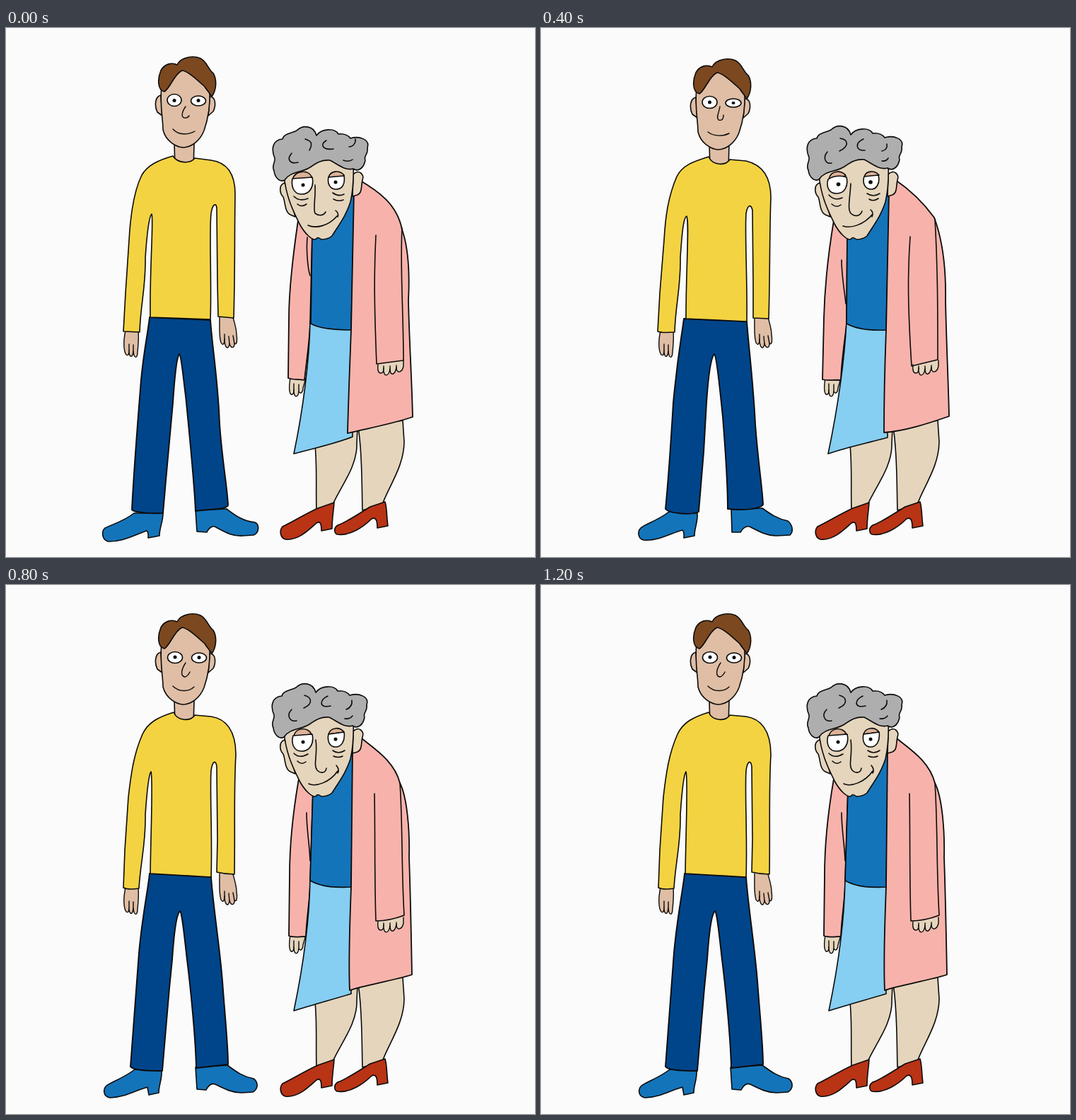
Write an HTML page without scripts that moves like this. It is 748 px wide and 748 px high and loops after 1.4 s.

```html
<!DOCTYPE html>
<html lang="en">
<head>
<meta charset="utf-8">
<title>Two people standing</title>
<style>
html, body { margin: 0; height: 100%; overflow: hidden; background: #fbfbfb; }
svg { display: block; width: 100%; height: 100%; }
path, ellipse { stroke: #0b0b0b; stroke-width: 1.6; stroke-linecap: round; stroke-linejoin: round; fill: none; }

.skin path, path.skin { fill: #dfbea5; }
.old path { fill: #e5d5bc; }
.hair { fill: #7c4820; }
.grey { fill: #aeaeae; }
path.lid { fill: #dcb196; }
.yellow path { fill: #f4d342; }
.navy path { fill: #00458a; stroke-width: 1.9; }
.blue path { fill: #1474ba; }
.sky path { fill: #86cef2; }
.pink path { fill: #f7b3ab; stroke-width: 1.8; }
.red path { fill: #b93315; }
.thin path { stroke-width: 1.4; }
path.line, .line path { fill: none; }
.eye { fill: #fff; }
ellipse.dot { fill: #0b0b0b; stroke: none; }

/* Three hand-drawn poses, held 200 ms each: a b c a b c b */
.a, .b, .c, .bob, .sway { animation: 1.4s step-end infinite; }
.a { animation-name: a; }
.b { animation-name: b; }
.c { animation-name: c; }
.bob { animation-name: bob; }
.sway { animation-name: sway; }
@keyframes a {
  0%, 42.857% { visibility: visible; }
  14.285%, 57.142%, 100% { visibility: hidden; }
}
@keyframes b {
  0%, 28.571%, 42.857%, 71.428% { visibility: hidden; }
  14.285%, 57.142%, 85.714%, 100% { visibility: visible; }
}
@keyframes c {
  0%, 42.857%, 85.714%, 100% { visibility: hidden; }
  28.571%, 71.428% { visibility: visible; }
}
@keyframes bob {
  0%, 42.857%, 85.714%, 100% { transform: none; }
  28.571%, 71.428% { transform: translate(0, 3px); }
}
@keyframes sway {
  0%, 42.857% { transform: none; }
  14.285%, 57.142%, 85.714%, 100% { transform: translate(-1px, 0); }
  28.571%, 71.428% { transform: translate(-1px, -1px); }
}
</style>
</head>
<body>
<svg viewBox="0 0 748 748">
  <!-- Man: shoes, hands, trousers -->
  <g class="blue">
    <path class="a" d="M181 686C168 697 147 703 140 707C135 711 135 723 144 726C166 727 183 716 199 711C202 713 201 717 201 721L217 718C217 706 222 699 222 686Z"/>
    <path class="b" d="M182 685C167 697 148 703 142 708C137 713 137 723 147 725C170 724 184 714 200 710L202 721L216 718C216 706 221 699 220 686Z"/>
    <path class="c" d="M181 684C166 696 146 702 141 707C136 712 137 722 145 724C166 726 184 714 200 710C203 713 202 717 202 721L217 718C217 706 222 699 221 686Z"/>
    <path class="a" d="M268 682L270 712L284 713C287 706 293 703 297 706C310 713 320 719 335 718L350 717C359 713 358 702 352 699C334 697 324 689 312 680Z"/>
    <path class="b" d="M268 682L270 713L283 714C287 706 291 704 296 706C310 713 320 718 333 718L349 717C358 712 356 702 350 698C334 695 324 687 313 679Z"/>
    <path class="c" d="M269 681L270 713L282 713C286 706 290 704 295 705C310 713 320 718 333 718L352 717C358 711 355 702 349 697C334 694 324 687 313 679Z"/>
  </g>
  <g class="skin thin">
    <path d="M169 428C165 446 167 458 170 462C173 464 174 461 174 456C174 466 179 468 180 457C181 468 186 468 186 458C187 448 188 440 187 428"/>
    <path class="line" d="M174 456V447M180 458V448"/>
    <path d="M302 408C302 424 301 436 304 445C307 450 309 446 309 440C309 453 315 456 316 446C318 454 323 453 323 446C327 449 327 440 326 434C326 425 323 417 321 409"/>
    <path class="line" d="M309 441V433M316 447L315 436M323 446L321 435"/>
  </g>
  <g class="navy">
    <path class="a" d="M203 409L289 413C292 455 300 500 302 560C306 615 313 650 314 675C312 681 290 680 268 683C266 640 258 560 254 520C250 490 248 463 245 461C241 466 238 500 236 530L226 640L222 686C205 687 180 685 178 681C180 640 186 560 190 510C193 465 201 430 203 409Z"/>
    <path class="b" d="M203 408L290 413C293 455 302 510 306 560C310 615 314 650 314 678L269 683C268 640 261 570 256 530C252 495 249 463 246 461C240 466 237 500 235 530L231 570L225 640L221 687C205 687 180 687 176 681C179 640 184 580 188 520C193 465 201 430 203 408Z"/>
    <path class="c" d="M202 411L291 415C294 455 300 500 303 560C307 615 313 650 314 674C309 681 285 682 264 680C264 650 261 600 257 550C253 510 248 463 245 461C239 468 236 500 234 530L230 600L223 684C215 689 182 687 176 680C180 640 184 580 187 530C193 465 199 435 202 411Z"/>
  </g>

  <!-- Man: neck and sweater -->
  <path class="skin" d="M238 163L239 200H265L266 163"/>
  <g class="yellow">
    <path class="a" d="M236 181C215 187 200 194 192 208C180 232 176 265 174 300L169 375L166 429L189 430C190 392 198 365 197 325C199 295 202 267 206 263C209 270 203 340 204 409L289 412C291 360 287 290 290 262C292 248 298 246 298 256L299 360L300 408L322 410C324 340 323 290 324 235C324 205 312 190 290 187L267 184C261 192 243 192 236 181Z"/>
    <path class="b" d="M237 180C215 187 201 194 193 211C181 238 177 265 173 300L168 375L166 428C172 431 182 430 188 429C190 392 198 365 197 325C199 295 202 268 205 264C208 275 205 340 204 408L290 413C292 360 288 290 290 262C292 248 297 247 298 257L299 360L298 406C306 408 314 409 323 409C324 340 322 290 325 240C325 206 311 189 290 186L267 184C261 193 243 193 237 180Z"/>
    <path class="c" d="M237 182C215 189 200 194 192 210C180 238 176 265 174 300L168 375L165 429C172 432 182 430 189 430C190 392 198 365 197 325C199 295 201 268 206 266C210 275 205 340 205 411L291 415C292 360 288 290 290 262C292 250 297 248 299 258L300 360L300 410L322 411C324 340 323 290 325 240C325 208 311 193 290 188L267 186C261 195 243 195 237 182Z"/>
  </g>

  <!-- Man: head -->
  <g class="bob">
    <g class="skin">
      <path d="M219 95C210 97 210 111 214 119L221 124Z"/>
      <path d="M288 97C297 97 297 110 293 118L286 124Z"/>
      <path d="M220 82C217 108 222 128 222 144C226 160 240 168 250 169C263 169 275 158 280 145C286 128 289 110 288 88L250 55Z"/>
    </g>
    <path class="hair" d="M224 90C214 88 214 72 219 60C224 51 234 48 242 52C248 40 266 39 275 43C284 47 286 59 293 64C299 74 297 89 291 97C288 92 284 88 281 83C271 74 259 62 249 60C237 66 233 84 224 90Z"/>
  </g>
  <g class="a thin">
    <ellipse class="eye" cx="238" cy="102" rx="10" ry="8.5"/>
    <ellipse class="eye" cx="272" cy="103" rx="10.5" ry="7"/>
    <ellipse class="dot" cx="238" cy="102.5" rx="2.5" ry="2.5"/>
    <ellipse class="dot" cx="272" cy="102.5" rx="2.5" ry="2.5"/>
    <path d="M254 111C247 121 248 128 254 127Q257 127 259 124M236 143C244 152 258 151 267 146"/>
  </g>
  <g class="b thin">
    <ellipse class="eye" cx="239" cy="102.5" rx="10.5" ry="8"/>
    <ellipse class="eye" cx="273" cy="103" rx="10.5" ry="7"/>
    <ellipse class="dot" cx="239" cy="102" rx="2.5" ry="2.5"/>
    <ellipse class="dot" cx="273" cy="102.5" rx="2.5" ry="2.5"/>
    <path d="M254 110C248 119 246 129 253 130Q257 129 260 123M236 143C245 152 259 151 266 144"/>
  </g>
  <g class="c thin">
    <ellipse class="eye" cx="238.5" cy="105" rx="10.5" ry="8.5"/>
    <ellipse class="eye" cx="272" cy="106" rx="11" ry="6"/>
    <ellipse class="dot" cx="238.5" cy="105" rx="2.5" ry="2.5"/>
    <ellipse class="dot" cx="272" cy="106" rx="2.5" ry="2"/>
    <path d="M253 111C252 119 247 127 251 130Q258 132 258 123M236 147C245 154 258 153 266 149"/>
  </g>

  <!-- Woman: legs and shoes -->
  <g class="old">
    <path d="M437 590C440 620 438 650 439 682L462 674C472 650 497 620 496 588L497 565Z"/>
    <path d="M498 565C504 600 503 650 504 682L532 674C540 650 563 620 563 585L561 555Z"/>
  </g>
  <g class="red">
    <path d="M464 671L441 679C425 686 404 699 391 705C386 711 388 721 395 723C413 725 428 710 439 700C444 697 446 700 446 711L461 708C461 695 463 684 464 671Z"/>
    <path d="M536 670L515 677C500 686 483 698 469 703C463 707 464 714 468 716C486 719 506 705 517 694C523 691 525 696 525 707L540 704C538 690 539 680 536 670Z"/>
  </g>

  <!-- Woman: left arm, skirt, shirt -->
  <g class="old thin">
    <path d="M402 495C400 507 400 515 403 518C406 519 407 516 407 512C407 523 413 524 414 514C417 519 420 514 420 509L424 495"/>
    <path class="line" d="M407 513V503M414 515V504"/>
  </g>
  <g class="pink">
    <path class="a" d="M413 272C406 320 400 370 400 410L399 495C406 498 414 496 422 498C425 470 429 445 430 420L433 290Z"/>
    <path class="b" d="M414 274C406 320 401 370 401 410L400 496C406 499 415 497 424 497C425 470 430 445 430 420L434 290Z"/>
    <path class="c" d="M414 272C406 320 401 370 400 410L398 497C406 499 414 497 424 498C425 470 429 445 432 420L433 290Z"/>
  </g>
  <g class="sky">
    <path class="a" d="M430 415C429 470 420 540 407 602C440 593 465 588 490 578L488 420Z"/>
    <path class="b" d="M430 415C429 480 420 540 407 602C435 593 462 586 488 578L488 420Z"/>
    <path class="c" d="M432 415C429 470 420 535 406 602C435 592 462 587 490 579L488 420Z"/>
  </g>
  <g class="blue">
    <path class="a" d="M433 290L431 418C445 426 468 427 488 427L493 225Z"/>
    <path class="b" d="M434 290L430 418C448 428 468 428 488 427L492 225Z"/>
    <path class="c" d="M433 290L432 418C448 427 468 428 488 427L493 225Z"/>
  </g>

  <!-- Woman: coat front and right hand -->
  <g class="pink">
    <path class="a" d="M498 214C527 231 553 249 560 285C568 308 571 345 569 385C570 440 574 500 575 550C545 560 512 566 483 573C484 530 486 480 488 427L492 232Z"/>
    <path class="b" d="M498 213C520 231 549 248 557 280C567 300 571 345 570 385C572 440 573 500 574 551C545 560 510 565 486 573C484 530 486 480 488 427L490 235Z"/>
    <path class="c" d="M500 214C525 231 543 250 556 268C566 295 573 330 572 385C573 440 576 500 577 549C545 560 514 570 485 572C485 530 486 480 488 427L492 235Z"/>
  </g>
  <g class="old thin">
    <path d="M526 476C525 485 527 488 530 488C533 488 534 484 534 481C533 494 541 494 543 482C543 493 550 491 552 480C552 489 560 488 562 478V470"/>
    <path class="line" d="M534 482V478M543 483V478M552 481V477"/>
  </g>
  <g class="line">
    <path class="a" d="M426 296C424 320 428 345 430 350M523 293C520 350 521 400 524 475L562 470C562 400 557 340 560 283"/>
    <path class="b" d="M425 322C425 345 429 365 430 390M521 295C522 350 521 420 523 475C535 475 550 472 563 467C559 400 561 340 557 280"/>
    <path class="c" d="M425 328C425 350 429 370 431 390M522 295C518 350 519 400 524 478L561 469C561 400 561 340 557 270"/>
  </g>

  <!-- Woman: head -->
  <g class="old">
    <path d="M394 219C385 222 387 234 392 239C395 246 394 260 402 264L409 267L400 230Z"/>
    <path d="M491 207C499 199 507 207 504 215C502 223 504 233 497 236L490 238Z"/>
    <path d="M393 208C396 240 407 260 415 277C422 290 432 300 438 299Q440 294 446 299Q455 299 461 294C471 278 481 265 487 246C491 228 492 213 491 190L440 175Z"/>
  </g>
  <g class="sway">
    <path class="grey" d="M380 184C374 170 378 158 391 157C393 149 404 149 411 145C419 137 435 137 439 152C446 142 465 141 470 150C478 149 484 152 487 156C500 152 515 158 511 169C513 179 505 180 508 187C506 198 498 204 491 199C479 202 470 193 458 187C447 186 440 190 430 197C418 205 403 202 394 215C387 219 380 211 379 202C375 195 381 190 380 184Z"/>
    <g class="a">
      <path d="M404 177C396 186 402 193 413 190M423 157C432 160 434 163 429 173M453 159C443 165 448 173 463 171M494 157C495 162 491 168 485 168M477 187Q485 190 490 186"/>
    </g>
    <g class="b">
      <path d="M405 176C397 184 402 194 412 192M423 156C434 159 435 168 422 174M456 157C444 162 443 175 460 171M490 163C491 170 487 174 482 176M480 189Q487 190 491 185"/>
    </g>
    <g class="c">
      <path d="M406 176C399 184 403 194 412 192M424 157C436 159 437 168 423 175M457 158C445 163 445 175 459 174M490 165C491 171 488 174 483 175M483 189Q489 190 492 185"/>
    </g>
  </g>
  <g class="a">
    <path class="lid" d="M405 214C409 201 427 200 432 210L431 213ZM456 211C459 201 472 201 478 208L477 211Z"/>
    <path class="eye" d="M405 213L433 211C436 225 429 235 418 235C406 235 403 223 405 213ZM456 211L478 209C480 221 475 228 467 228C458 228 454 220 456 211Z"/>
    <ellipse class="dot" cx="420" cy="222" rx="2.5" ry="2.5"/>
    <ellipse class="dot" cx="466" cy="218" rx="2.5" ry="2.5"/>
    <path d="M437 222C438 240 434 256 437 262C441 265 448 267 452 260M427 279C438 284 456 280 468 266M466 258Q471 262 469 267M407 238Q415 246 427 241M412 249Q418 254 425 249M462 233Q470 239 478 235M463 242Q470 246 477 243"/>
  </g>
  <g class="b">
    <path class="lid" d="M407 214C409 201 427 200 432 211ZM456 211C459 201 472 200 478 208Z"/>
    <path class="eye" d="M406 213L433 211C436 225 429 235 418 235C406 235 403 223 406 213ZM456 211L478 208C480 221 474 229 466 229C457 229 454 220 456 211Z"/>
    <ellipse class="dot" cx="420" cy="222" rx="2.5" ry="2.5"/>
    <ellipse class="dot" cx="466" cy="218" rx="2.5" ry="2.5"/>
    <path d="M438 219C441 240 434 255 440 262C445 267 452 266 453 259M428 281C438 286 458 279 469 263M467 255Q472 261 469 266M407 238Q415 246 427 239M412 249Q418 255 424 250M462 234Q470 240 479 234M463 242Q470 245 476 242"/>
  </g>
  <g class="c">
    <path class="lid" d="M407 214C409 201 426 200 431 209ZM457 211C459 201 472 201 478 208Z"/>
    <path class="eye" d="M406 214C413 209 424 208 432 211C435 224 429 234 418 234C406 234 403 223 406 214ZM457 210L477 208C480 220 474 228 467 228C458 228 454 219 457 210Z"/>
    <ellipse class="dot" cx="420.5" cy="221" rx="2.8" ry="2.8"/>
    <ellipse class="dot" cx="466" cy="218" rx="2.8" ry="2.8"/>
    <path d="M438 220C437 240 433 256 438 262C443 267 451 267 454 259M427 280C438 284 457 278 469 263M466 257Q471 261 468 267M407 236Q415 245 426 240M411 249Q418 255 424 250M461 234Q470 240 479 234M464 242Q470 246 477 241"/>
  </g>
</svg>
</body>
</html>
```
